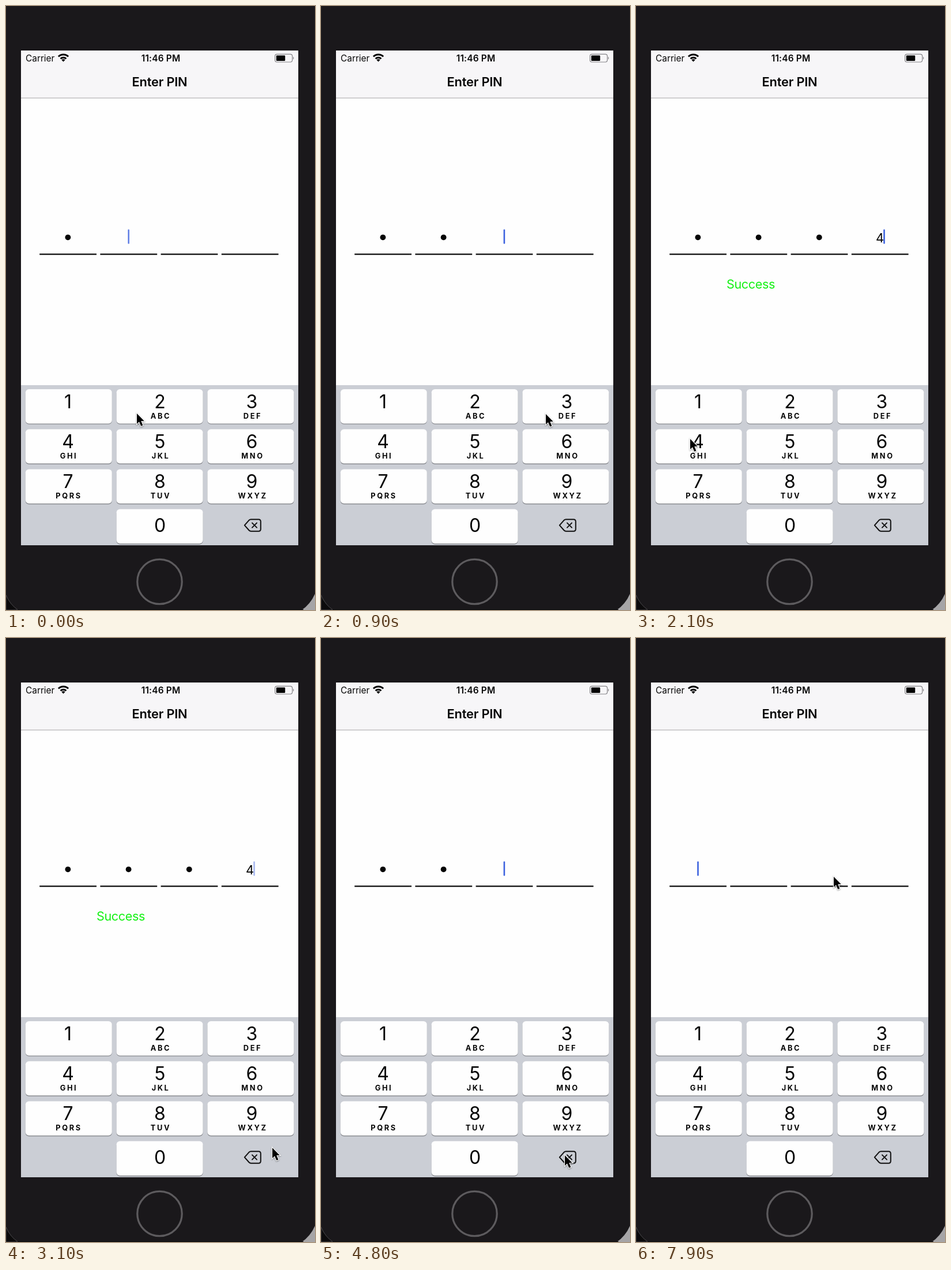
Write an HTML page that moves like this. It is 536 px wide and 1045 px high and loops after 8 s.

```html
<!DOCTYPE html>
<html lang="en">
<head>
<meta charset="utf-8">
<title>Enter PIN</title>
<style>
  html, body { margin: 0; width: 100%; height: 100%; overflow: hidden; background: #1a181b; }
  svg { display: block; width: 536px; height: 1045px; font-family: Inter, Roboto, sans-serif; }
  .mid, .digit, .abc { text-anchor: middle; }
  .digit { font-size: 32px; }
  .abc { font-size: 12.8px; font-weight: 700; letter-spacing: 2.6px; }
</style>
</head>
<body>
<svg viewBox="0 0 536 1045" fill="#050505">
  <!-- phone body -->
  <rect width="536" height="1045" fill="#1a181b"/>
  <path d="M0 1019Q7 1036 21 1045H0Z" fill="#0c0b0c" stroke="#4b494c"/>
  <path d="M536 1017Q528 1035 513 1045H536Z" fill="#a6a5a7"/>
  <path d="M20 1044.5H516" stroke="#09090a"/>
  <circle cx="266.5" cy="996" r="38.7" fill="none" stroke="#5d5b5e" stroke-width="3.2"/>

  <!-- screen and header -->
  <rect x="26" y="77" width="481" height="856" fill="#fefefe"/>
  <rect x="26" y="77" width="481" height="82" fill="#f7f6f8"/>
  <rect x="26" y="158.6" width="481" height="1.2" fill="#b3b2b5"/>
  <text x="34" y="95.5" font-size="15.4">Carrier</text>
  <g fill="none" stroke="#050505" stroke-width="2.9">
    <path d="M90.9 87.6A12 12 0 0 1 108.1 87.6"/>
    <path d="M94.6 91.3A6.9 6.9 0 0 1 104.4 91.3"/>
  </g>
  <path d="M99.5 96.4L96.4 93.2A4.4 4.4 0 0 1 102.6 93.2Z"/>
  <text class="mid" x="268.5" y="95.5" font-size="15.4" font-weight="600" letter-spacing=".2">11:46 PM</text>
  <rect x="466.6" y="83.4" width="30" height="13.6" rx="3.4" fill="none" stroke="#858487" stroke-width="1.2"/>
  <rect x="468.8" y="85.5" width="15.4" height="9.4" rx="1.2"/>
  <path d="M498 87.6Q500.6 90.2 498 92.8Z" fill="#858487"/>
  <text class="mid" x="266.5" y="138.8" font-size="21.8" font-weight="600" letter-spacing="-.2">Enter PIN</text>

  <!-- PIN fields -->
  <g id="fields"></g>
  <text id="typed" class="mid" x="423" y="408.5" font-size="21.8">4</text>
  <text id="success" x="157" y="489" font-size="21.6" letter-spacing="-.4" fill="#14f114">Success</text>
  <rect id="caret" y="386.5" width="2.6" height="25" rx="1" fill="#3c62de"/>

  <!-- keyboard -->
  <rect x="26" y="656" width="481" height="277" fill="#cbced5"/>
  <g id="keys"></g>
  <g fill="none" stroke="#111" stroke-width="2" stroke-linecap="round" stroke-linejoin="round">
    <path d="M413.8 898.4L421.4 889.8Q423 888.2 425 888.2H438Q441.8 888.2 441.8 892V905Q441.8 908.7 438 908.7H425Q423 908.7 421.4 907Z"/>
    <path d="M427 894.4L435 902.4M435 894.4L427 902.4"/>
  </g>

  <path id="pointer" d="M0 0V18L4 14.3 7.2 21.8 10.4 20.4 7.3 13H12.8Z" fill="#000" stroke="#fff"
        stroke-width="2.2" paint-order="stroke" style="filter:drop-shadow(0 1px 1px #0006)"/>
</svg>
<script>
const $ = id => document.getElementById(id);
const show = (id, on) => $(id).setAttribute('visibility', on ? 'visible' : 'hidden');
const fieldX = i => 107.4 + 105.2 * i;

$('fields').innerHTML = [0, 1, 2, 3].map(i => `
  <rect x="${fieldX(i) - 49.2}" y="428.4" width="98.8" height="2.2"/>
  <circle id="dot${i}" cx="${fieldX(i)}" cy="400.3" r="4.9"/>`).join('');

const letters = ['', 'ABC', 'DEF', 'GHI', 'JKL', 'MNO', 'PQRS', 'TUV', 'WXYZ'];
function key(n, col, row) {
  const x = 33.8 + 157.8 * col, y = 663 + 69.2 * row, mid = 107.5 + 159.5 * col;
  return `<rect x="${x}" y="${y + 1.4}" width="150" height="59.4" rx="6" fill="#898b90"/>
    <rect id="key${n}" x="${x}" y="${y}" width="150" height="59.4" rx="6"/>
    <text class="digit" x="${mid}" y="${y + (n ? 32.5 : 39.7)}">${n}</text>
    <text class="abc" x="${mid + 1.5}" y="${y + 51}">${letters[n - 1] || ''}</text>`;
}
$('keys').innerHTML = letters.map((_, i) => key(i + 1, i % 3, i / 3 | 0)).join('') + key(0, 1, 3);

// One digit is in already; each tap is released at its time
const taps = [
  { at: -500, key: 1 }, { at: 500, key: 2 }, { at: 1150, key: 3 }, { at: 2100, key: 4 },
  ...[3900, 4800, 5600, 6600].map(at => ({ at, key: 'delete' }))
];

// Pointer strokes: when they run, where they end, how far they sag
const home = { x: 227, y: 705 };
const strokes = [
  { from: 500, to: 900, x: 390, y: 706, sag: 0 },
  { from: 1200, to: 1600, x: 94, y: 749, sag: 30 },
  { from: 2600, to: 3100, x: 462, y: 882, sag: 130 },
  { from: 3100, to: 3400, x: 423, y: 895, sag: 0 },
  { from: 7000, to: 7400, x: 404, y: 442, sag: 0 },
  { from: 7500, to: 7900, x: 343, y: 413, sag: 0 }
];

const clamp = v => Math.max(0, Math.min(1, v));
const ease = k => k * k * (3 - 2 * k);

function pointerAt(t) {
  let { x, y } = home;
  for (const s of strokes) {
    const k = ease(clamp((t - s.from) / (s.to - s.from)));
    x += (s.x - x) * k;
    y += (s.y - y) * k + s.sag * Math.sin(Math.PI * k);
  }
  return [x, y];
}

// Solid after each tap, then a one second blink with soft edges
function caretAlpha(age) {
  const phase = age % 1000;
  const fadeIn = age < 1000 ? 1 : .45 + phase / 180;
  return phase < 450 ? clamp(fadeIn) : clamp((700 - phase) / 250) + clamp((phase - 900) / 222);
}

function draw(now) {
  const t = Math.floor(now % 8000 / 100) * 100;
  const done = taps.filter(tap => tap.at <= t);
  const count = done.reduce((n, tap) => n + (tap.key === 'delete' ? -1 : 1), 0);
  const full = count === 4;

  for (let i = 0; i < 4; i++) show('dot' + i, i < Math.min(count, 3));
  show('typed', full);
  show('success', full);
  $('caret').setAttribute('x', full ? 429.2 : fieldX(count) - 1.2);
  $('caret').setAttribute('opacity', caretAlpha(t - done.at(-1).at));

  const held = taps.find(tap => t < tap.at && t >= tap.at - 100)?.key;
  for (let n = 0; n < 10; n++) $('key' + n).setAttribute('fill', n === held ? '#b4b9c3' : '#fefefe');
  $('pointer').setAttribute('transform', `translate(${pointerAt(t)})`);
}

const begin = performance.now();
function tick() {
  draw(performance.now() - begin);
  requestAnimationFrame(tick);
}
tick();
</script>
</body>
</html>
```
